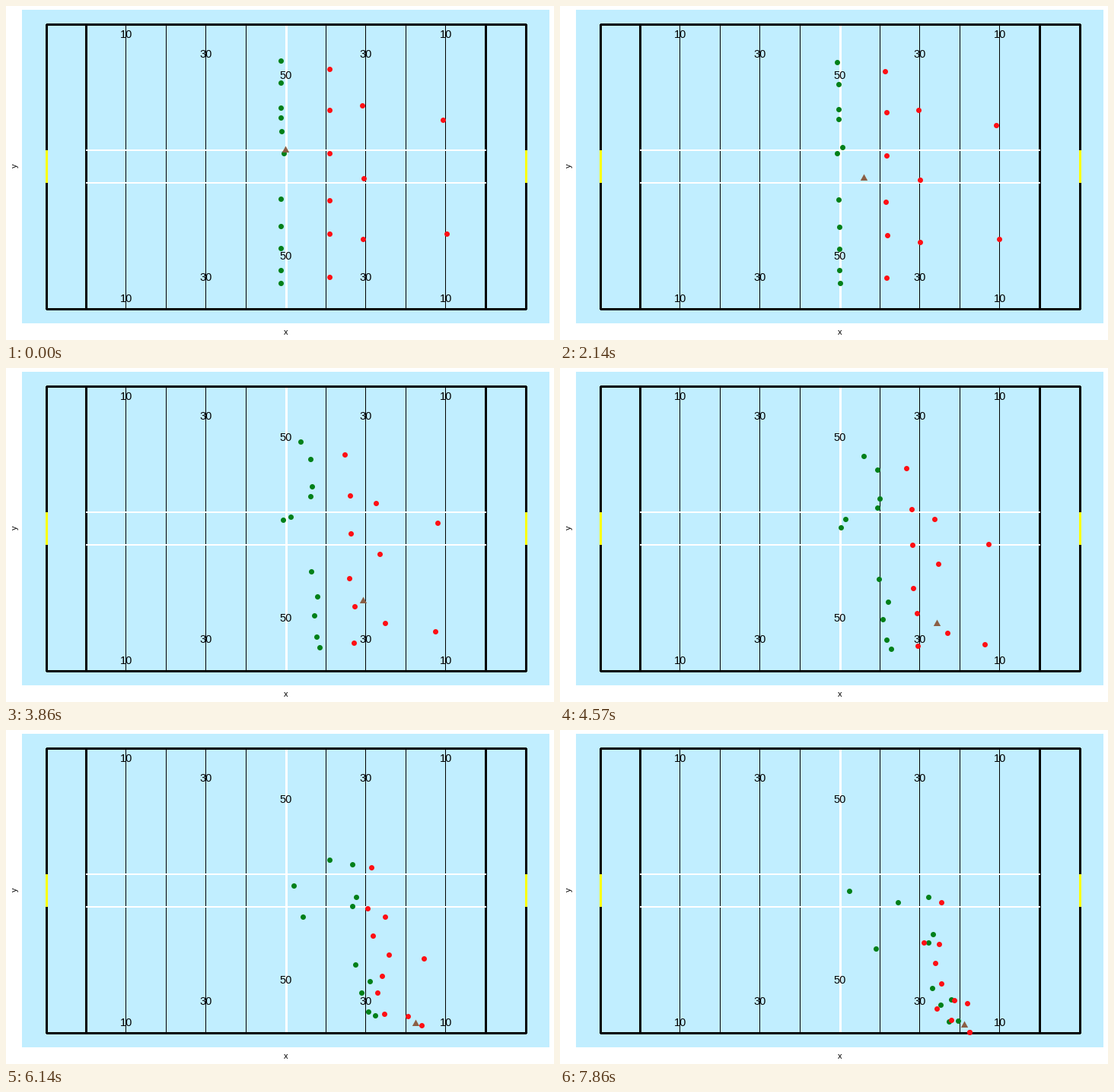
A matplotlib script for the animation above (8000 ms loop, 720 by 440 pixels).

```python
import numpy as np
import matplotlib.pyplot as plt
from matplotlib.animation import FuncAnimation
from matplotlib.patches import Polygon, Rectangle

W, H, DPI = 720, 440, 80
PX = 72 / DPI                  # points per pixel
LOOP_MS, TICK_MS = 8000, 20
POSES = 56                     # players move in this many steps per loop
KICK, GO, CAUGHT, END = 10, 12, 43, 55
MID = 0.573                    # share of a run done at its midway point


# --- motion -----------------------------------------------------------

def effort(pose):
    """Run progress: a soft start, then an almost steady pace."""
    u = np.clip((pose - GO) / (END - GO), 0, 1)
    return (u + u * u * (3 - 2 * u)) / 2


def arc(start, mid, end, s):
    """Parabola through three points, reaching mid at s = MID."""
    bow = mid - start - MID * (end - start)
    return start + s * (end - start) + bow * s * (1 - s) / (MID * (1 - MID))


def kicker(pose):
    times = (0, GO, 20, END)
    return np.array([np.interp(pose, times, (361, 368, 372, 379)),
                     np.interp(pose, times, (164, 181, 191, 211))])


def ball(pose):
    tee, catch, last = np.array([(367, 189), (538, 386), (531, 388)])
    if pose <= CAUGHT:
        u = max(0, (pose - KICK) / (CAUGHT - KICK))
        return tee + (catch - tee) * (1 - (1 - u) ** 1.25)
    return catch + (last - catch) * (pose - CAUGHT) / (END - CAUGHT)


def line_up(x, ys):
    return np.array([(x, y) for y in ys], float)


# Kicking side: a line that first sprints forward, then turns to the ball
cover = line_up(360, (71, 100, 133, 146, 253, 289, 318, 347, 364))
cover_end = np.array([(443, 226), (483, 219), (489, 268), (483, 279),
                      (488, 339), (513, 354), (499, 361), (510, 383),
                      (522, 382)])
cover_mid = cover + (MID, 0.4) * (cover_end - cover)
safety = np.array([(364, 193), (374, 220), (414, 287)])

# Receiving side: the front line drops back, more so near the ball's side
front = line_up(423.5, (82, 136, 193, 255, 299, 356))
front_end = np.array([(500, 226), (477, 279), (492, 306),
                      (517, 355), (494, 366), (513, 381)])
front_mid = front + 0.46 * (front_end - front)
front_mid[:, 0] = front[:, 0] + 35 + 0.06 * front[:, 1]

# Back players: start, midway and end of each run
back = np.array([
    [(467, 130), (494, 216), (497, 281)],
    [(469, 226), (499, 270), (500, 333)],
    [(468, 306), (516, 359), (537, 397)],
    [(573, 149), (557, 256), (534, 359)],
    [(578, 299), (552, 374), (537, 397)],
])


def green_team(pose):
    s = effort(pose)
    return np.vstack([arc(cover, cover_mid, cover_end, s),
                      arc(*safety, s), kicker(pose)])


def red_team(pose):
    s = effort(pose)
    return np.vstack([arc(front, front_mid, front_end, s),
                      arc(back[:, 0], back[:, 1], back[:, 2], s)])


# --- pitch ------------------------------------------------------------

fig = plt.figure(figsize=(W / DPI, H / DPI), dpi=DPI, facecolor="white")
ax = fig.add_axes([0, 0, 1, 1])
ax.set(xlim=(0, W), ylim=(H, 0))
ax.axis("off")


def bar(x0, y0, x1, y1, color, z):
    ax.add_patch(Rectangle((x0, y0), x1 - x0, y1 - y0, fc=color, lw=0,
                           antialiased=False, zorder=z))


def vline(x, width, color, z, top=24, bottom=400):
    left = x - width // 2
    bar(left, top, left + width, bottom, color, z)


def label(x, y, text, size, **kw):
    ax.text(x, y, text, fontsize=size * PX, family="Liberation Sans",
            color="black", ha="center", zorder=5, **kw)


bar(21, 5, 714, 418, "#c1eeff", 0)
for i in range(1, 10):
    x = int(105 + 52.5 * i)
    if i == 5:
        vline(368, 3, "white", 2)
    else:
        vline(x, 1, "black", 1)
for x in (53, 105, 630, 683):
    vline(x, 3, "black", 3)
for y in (23, 398):
    bar(53, y, 684, y + 3, "black", 3)
for y in (189, 232):
    bar(105, y, 631, y + 2, "white", 4)
for x in (53, 683):
    vline(x, 3, "#ffff00", 4, 190, 233)

for dx, num, top, bottom in ((210, "10", 38, 386), (105, "30", 63, 358),
                             (0, "50", 91, 330)):
    for x in {368 - dx, 368 + dx}:
        for y in (top, bottom):
            label(x, y + 4.5, num, 14.5, va="baseline")
label(368, 433, "x", 11, va="baseline")
label(12, 210.5, "y", 11, va="center", rotation=90)


def dots(color):
    return ax.scatter(np.zeros(11), np.zeros(11), s=(7 * PX) ** 2, c=color,
                      linewidths=0, antialiased=False, zorder=6)


green_dots = dots("#008019")
red_dots = dots("#ff0f14")
TRIANGLE = np.array([(0, -5), (-4.7, 3.5), (4.7, 3.5)])
ball_mark = ax.add_patch(Polygon(TRIANGLE, fc="#8b5f45", lw=0, zorder=7))


def on_pixel(points):
    return np.round(points) + 0.5


def draw(tick):
    # The extra 15 ms makes each pose start on its nearest tick
    pose = min(END, int((tick * TICK_MS + 15) * POSES / LOOP_MS))
    green_dots.set_offsets(on_pixel(green_team(pose)))
    red_dots.set_offsets(on_pixel(red_team(pose)))
    ball_mark.set_xy(TRIANGLE + on_pixel(ball(pose)))
    return green_dots, red_dots, ball_mark


anim = FuncAnimation(fig, draw, frames=LOOP_MS // TICK_MS, interval=TICK_MS,
                     init_func=lambda: draw(0), repeat=True, repeat_delay=0)
plt.show()
```
